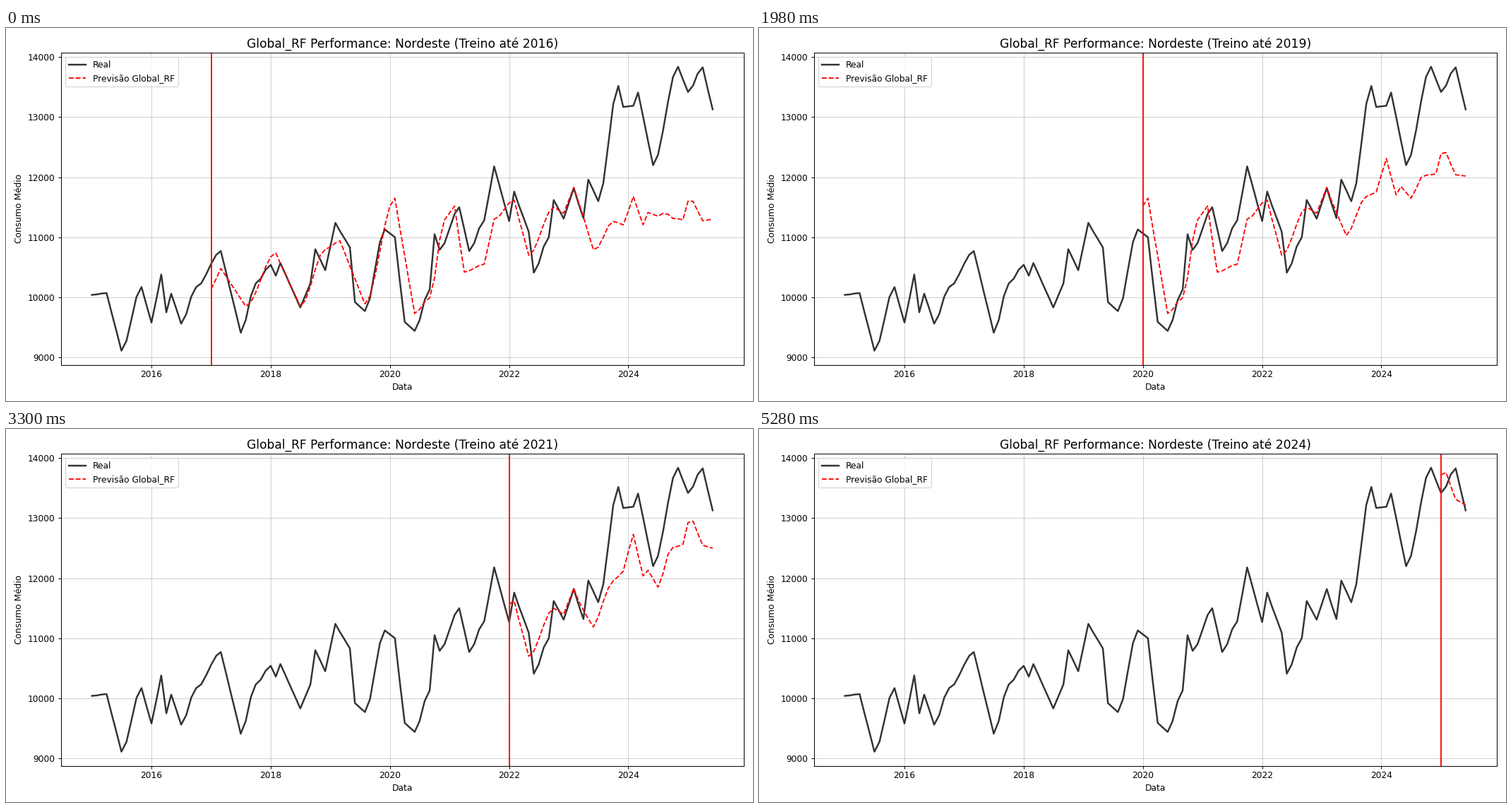
Recreate the animation shown at these times as a matplotlib script. Size 1058 by 529 pixels, loop 5940 ms.

```python
import matplotlib.dates as mdates
import matplotlib.pyplot as plt
import numpy as np
from matplotlib.animation import FuncAnimation

W, H = 1058, 529
DPI = W / 12
STEP_MS = 660
FIRST_YEAR = 2015
CUTOFFS = range(2016, 2025)

# Turning points as (months since the first January, value)
ACTUAL = [
    (0, 10040), (3, 10070), (6, 9110), (10, 10170), (12, 9580), (14, 10380),
    (15, 9750), (16, 10060), (18, 9560), (21, 10170), (26, 10770), (30, 9410),
    (33, 10230), (36, 10540), (37, 10360), (38, 10570), (42, 9830), (44, 10230),
    (45, 10800), (47, 10450), (49, 11240), (52, 10830), (53, 9920), (55, 9770),
    (59, 11130), (61, 11000), (63, 9590), (65, 9440), (68, 10130), (69, 11050),
    (70, 10790), (74, 11500), (76, 10770), (79, 11280), (81, 12180), (84, 11270),
    (85, 11760), (88, 11090), (89, 10410), (92, 11000), (93, 11620), (95, 11310),
    (97, 11820), (99, 11320), (100, 11960), (102, 11600), (106, 13520),
    (107, 13170), (109, 13190), (110, 13410), (113, 12200), (118, 13840),
    (120, 13420), (123, 13830), (125, 13130)]

# Forecast shape shared by all cutoffs, at its level for the 2018 one
FORECAST = [
    (24, 10140), (26, 10480), (31, 9850), (37, 10740), (42, 9850), (47, 10800),
    (50, 10940), (55, 9890), (61, 11650), (65, 9730), (68, 9990), (71, 11290),
    (73, 11520), (75, 10420), (79, 10550), (81, 11300), (85, 11620), (88, 10700),
    (93, 11500), (95, 11400), (97, 11830), (101, 10950), (105, 11540),
    (107, 11570), (109, 12100), (111, 11540), (112, 11700), (114, 11550),
    (116, 11790), (119, 11800), (120, 12130), (121, 12140), (123, 11785),
    (125, 11780)]

# How much each further training year lifts the forecast
LIFT = [(24, 0), (97, 0), (104, 130), (109, 210), (114, 100), (117, 240),
        (121, 270), (125, 240)]


def trace(points, t):
    """Join the points: rises ease in and out, falls are straight."""
    x, y = np.array(points, float).T
    i = np.clip(np.searchsorted(x, t, "right") - 1, 0, len(x) - 2)
    p = (t - x[i]) / (x[i + 1] - x[i])
    p = np.where(y[i + 1] > y[i], p * p * (3 - 2 * p), p)
    return y[i] + (y[i + 1] - y[i]) * p


def first_month(cutoff):
    return 12 * (cutoff + 1 - FIRST_YEAR)


def forecast(cutoff):
    t = months[first_month(cutoff):]
    return trace(FORECAST, t) + (cutoff - 2018) * trace(LIFT, t)


def heading(cutoff):
    return f"Global_RF Performance: Nordeste (Treino até {cutoff})"


calendar = np.arange("2015-01", "2025-07", dtype="datetime64[M]")
dates = mdates.date2num(calendar.astype("datetime64[D]"))
months = np.arange(len(dates))

plt.rcParams["font.family"] = "DejaVu Sans"
fig, ax = plt.subplots(figsize=(12, 6), dpi=DPI)
fig.subplots_adjust(left=77.7 / W, right=1044.8 / W,
                    top=1 - 34.8 / H, bottom=1 - 477.8 / H)
ax.xaxis_date()
ax.plot(dates, trace(ACTUAL, months), color="black", alpha=0.8, lw=2, label="Real")
ax.set(xlim=ax.get_xlim(), ylim=ax.get_ylim())
forecast_line, = ax.plot([], [], "r--", lw=1.5, label="Previsão Global_RF")
cutoff_line = ax.axvline(dates[0], color="red", lw=1.5)
title = ax.set_title(heading(CUTOFFS[0]), fontsize=14)
ax.set_xlabel("Data")
ax.set_ylabel("Consumo Médio")
ax.tick_params(axis="x", pad=2.6)
ax.legend(loc="upper left")
ax.grid(True, alpha=0.6)


def draw(i):
    cutoff = CUTOFFS[i]
    start = first_month(cutoff)
    forecast_line.set_data(dates[start:], forecast(cutoff))
    cutoff_line.set_xdata([dates[start]] * 2)
    title.set_text(heading(cutoff))
    return forecast_line, cutoff_line, title


anim = FuncAnimation(fig, draw, frames=len(CUTOFFS), interval=STEP_MS,
                     repeat=True, repeat_delay=0)
plt.show()
```
